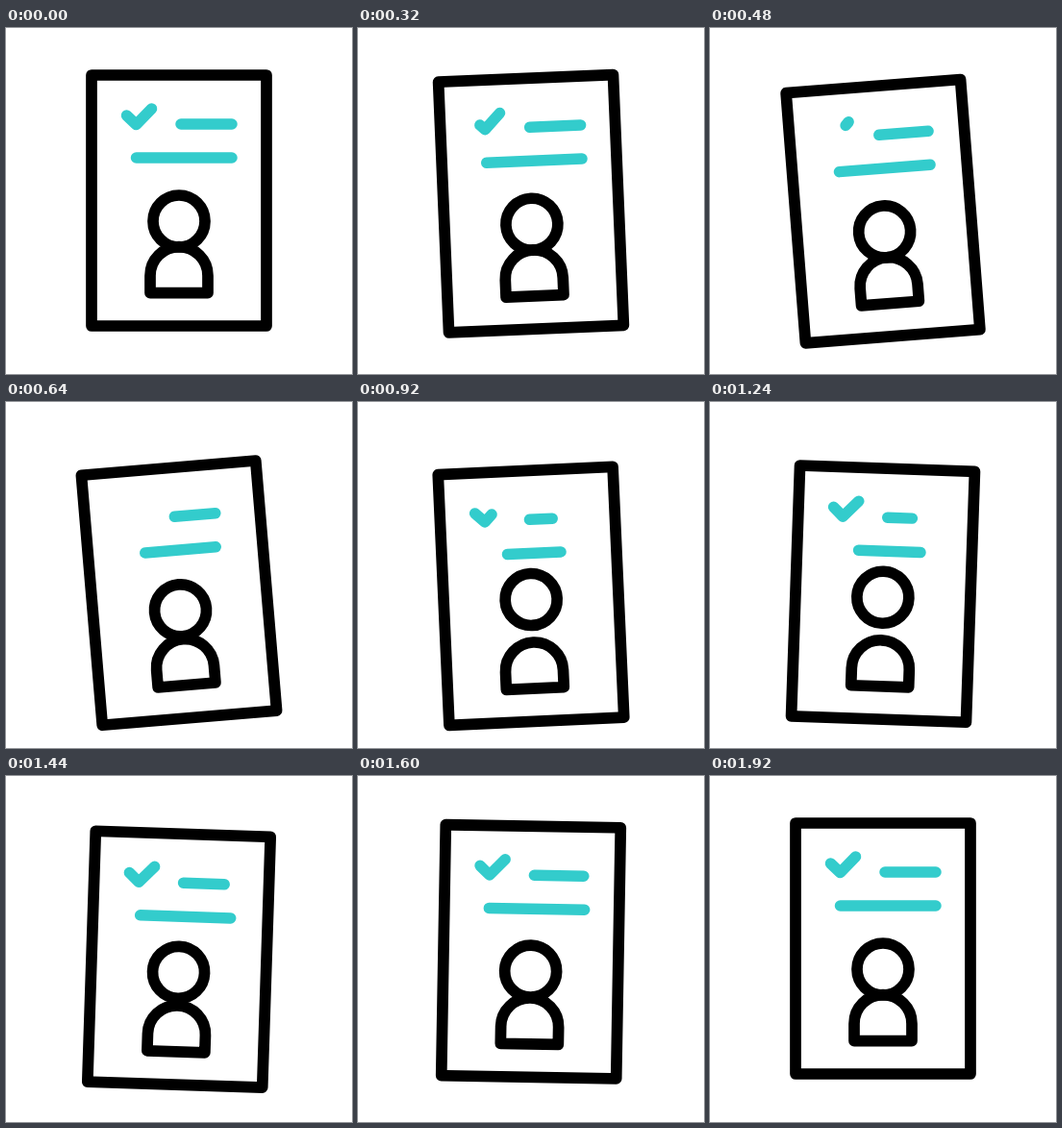
These frames come from a looping animation (360x360 px, 1.96 s). An HTML page:

```html
<!DOCTYPE html>
<html lang="en">
<head>
<meta charset="utf-8">
<title>Application form</title>
<style>
  html, body { margin: 0; width: 100%; height: 100%; overflow: hidden; background: #fff; }
  svg { display: block; width: 100%; height: 100%; }
</style>
</head>
<body>
<svg viewBox="0 0 360 360" fill="none" stroke="#000" stroke-width="11.7" stroke-linecap="round" stroke-linejoin="round">
  <g id="card">
    <rect x="89" y="49" width="182" height="261"/>
    <circle id="head" cx="180" cy="201" r="27"/>
    <path d="M150 275.7V257.7a30 30 0 0 1 60 0V275.7Z"/>
    <g stroke="#33cccc" stroke-width="11.5">
      <path id="check" pathLength="1" d="M125.5 91L135.5 100.5L151.5 84"/>
      <path id="shortLine"/>
      <path id="longLine"/>
    </g>
  </g>
</svg>
<script>
const LOOP = 1960, STEP = 40;
const [card, head, check, shortLine, longLine] =
  ['card', 'head', 'check', 'shortLine', 'longLine'].map(id => document.getElementById(id));

// Strong ease in and out: cubic-bezier(.66, 0, .34, 1)
function ease(x) {
  let lo = 0, hi = 1;
  for (let i = 0; i < 24; i++) {
    const s = (lo + hi) / 2, r = 1 - s;
    if (1.98 * s * r * r + 1.02 * s * s * r + s * s * s < x) lo = s; else hi = s;
  }
  return lo * lo * (3 - 2 * lo);
}

// Eased value between [time, value] keys, held outside them
function track(t, ...keys) {
  if (t <= keys[0][0]) return keys[0][1];
  for (let i = 1; i < keys.length; i++) {
    const [t0, v0] = keys[i - 1], [t1, v1] = keys[i];
    if (t < t1) return v0 + (v1 - v0) * ease((t - t0) / (t1 - t0));
  }
  return keys[keys.length - 1][1];
}

function draw(t) {
  const drop = track(t, [0, 0], [960, 22.4], [1920, 0]);
  const tilt = track(t, [0, 0], [640, -4.8], [1280, 2], [1920, 0]);
  card.setAttribute('transform', `translate(0 ${drop}) rotate(${tilt} 180 179.5)`);

  const lift = track(t, [400, 0], [1080, 19], [1760, 0]);
  head.setAttribute('cy', 201 - lift);

  const shortCut = track(t, [320, 0], [1040, 30], [1760, 0]);
  shortLine.setAttribute('d', `M182 100H${235 - shortCut}`);

  const longCut = track(t, [280, 0], [960, 22], [1000, 22], [1640, 0]);
  longLine.setAttribute('d', `M${135.5 + longCut} 135H${235 - longCut}`);

  // The tick is wiped from its start, then written again
  const from = t < 640 ? track(t, [140, 0], [640, 1]) : 0;
  const to = t < 640 ? 1 : track(t, [640, 0], [1140, 1]);
  check.setAttribute('visibility', to - from > 0.002 ? 'visible' : 'hidden');
  check.setAttribute('stroke-dasharray', from > 0 || to < 1 ? `${to - from} 2` : 'none');
  check.setAttribute('stroke-dashoffset', -from);
}

const start = performance.now();
function tick() {
  const t = (performance.now() - start) % LOOP;
  draw(Math.floor(t / STEP) * STEP);
  requestAnimationFrame(tick);
}
tick();
</script>
</body>
</html>
```
